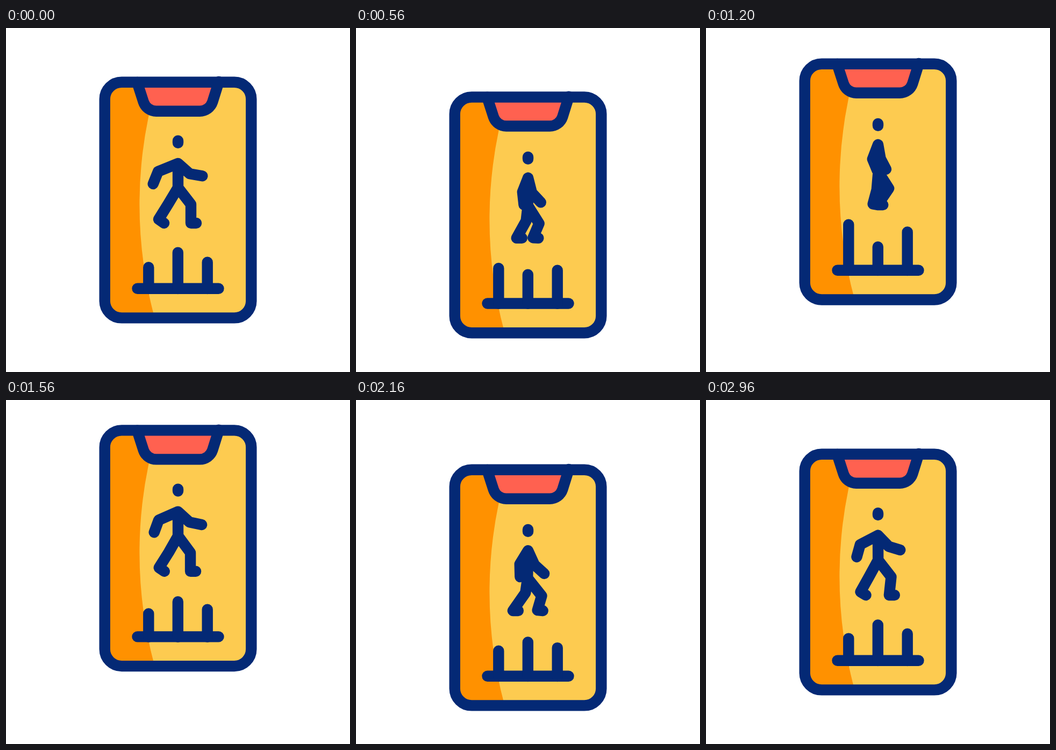
Recreate the animation shown at these times as an HTML page. Size 640 px wide and 640 px high, loop 3000 ms.

```html
<!DOCTYPE html>
<html lang="en">
<head>
<meta charset="utf-8">
<title>Step counter</title>
<style>
  html, body { margin: 0; width: 100%; height: 100%; overflow: hidden; background: #fff; }
  svg { display: block; width: 100%; height: 100%; }
  .line { fill: none; stroke: #042975; stroke-width: 20.4; stroke-linecap: round; stroke-linejoin: round; }
</style>
</head>
<body>
<svg viewBox="0 0 640 640">
  <defs>
    <clipPath id="screen"><rect x="183.7" y="100.7" width="272.6" height="438.7" rx="31.5"/></clipPath>
  </defs>
  <g id="phone">
    <g clip-path="url(#screen)">
      <rect x="183" y="100" width="274" height="440" fill="#fdcb50"/>
      <path d="M183 100H281.5A805 805 0 0 0 276.7 540H183Z" fill="#ff9100"/>
      <path d="M244 101L255.8 137.6A25 25 0 0 0 279.5 154.7H360.5A25 25 0 0 0 384.2 137.6L396 100Z" fill="#ff6150"/>
    </g>
    <path class="line" d="M244 101L255.8 137.6A25 25 0 0 0 279.5 154.7H360.5A25 25 0 0 0 384.2 137.6L396 100"/>
    <rect class="line" x="183.7" y="100.7" width="272.6" height="438.7" rx="31.5"/>
    <path class="line" d="M244.5 484.7H395.5"/>
    <path class="line" id="bars"/>
    <path class="line" id="walker"/>
  </g>
</svg>
<script>
const LOOP = 3000, STEP = 40, STRIDE = LOOP / 2, BEAT = LOOP / 4;
const LOW = 31.3, HIGH = -44.3;
const [phone, bars, walker] = ['phone', 'bars', 'walker'].map(id => document.getElementById(id));

const clamp = u => Math.min(1, Math.max(0, u));
const smooth = u => u * u * (3 - 2 * u);
const mix = (a, b, u) => a + (b - a) * u;

// cubic-bezier(.25, .1, .25, 1)
function ease(x) {
  const curve = (p, q, u) => 3 * p * u * (1 - u) ** 2 + 3 * q * u * u * (1 - u) + u ** 3;
  let lo = 0, hi = 1;
  for (let i = 0; i < 24; i++) {
    const u = (lo + hi) / 2;
    if (curve(0.25, 0.25, u) < x) lo = u; else hi = u;
  }
  return curve(0.1, 1, lo);
}

// The phone sinks, jumps, sinks again and returns
function lift(t) {
  const go = (y, to, start, length) => mix(y, to, ease(clamp((t - start) / length)));
  let y = go(0, LOW, 330, 380);
  y = go(y, HIGH, 768, 760);
  y = go(y, LOW, 1568, 760);
  return go(y, 0, 2368, 380);
}

function drawBars(t) {
  const s = smooth(1 - Math.abs(1 - 2 * (t % BEAT) / BEAT));
  const bar = (x, from, to) => `M${x} ${mix(from, to, s).toFixed(2)}V485`;
  return bar(265.3, 445.2, 394.2) + bar(319.8, 417.7, 443.7) + bar(374.7, 435.7, 410.7);
}

// Each joint swings along an arc and back; the swinging knee leads
function drawWalker(time) {
  const t = time % STRIDE;
  const back = t > BEAT;
  const s = back ? 1 - smooth(clamp((t - 790) / 790)) : smooth(t / BEAT);
  const arc = 4 * s * (1 - s);
  const sink = 3.5 * smooth(clamp(1 - Math.abs(t - 840) / 180));

  const joint = (from, to, sag, lead = 0) => [
    mix(from[0], to[0], s) + arc * (sag[0] + (back ? -lead : lead)),
    mix(from[1], to[1], s) + arc * sag[1]
  ];
  const upper = (...path) => {
    const [x, y] = joint(...path);
    return [x, y + sink];
  };
  const toe = foot => [foot[0] + 10, 363];
  const limb = (...points) => 'M' + points.map(p => p.map(n => n.toFixed(2)).join(' ')).join('L');

  const head = upper([320, 209.8], [320, 211.8], [0, 1]);
  const neck = upper([320, 252], [320, 251.3], [0, -0.7]);
  const hip = upper([320, 297], [319, 302.3], [1, 2]);
  const footA = joint([284, 356], [340.5, 362], [-2, 2.5], -2);
  const footB = joint([344, 363], [289.5, 363], [1, 0]);

  return limb(head, [head[0], head[1] + 4]) +
    limb(neck, hip) +
    limb(neck, upper([283, 267], [333.5, 277], [3, 6]), upper([273.7, 290], [352, 293], [8, 7.5])) +
    limb(neck, upper([342, 271.3], [303, 276], [1, 3.5]), upper([365.3, 275.2], [303, 299.5], [-1, 10])) +
    limb(hip, joint([302, 327], [347, 335], [-2, 4], 3.5), footA, toe(footA)) +
    limb(hip, joint([344, 328], [315, 329], [2, 4], -7.8), footB, toe(footB));
}

const began = performance.now();

function draw() {
  const now = Math.max(0, performance.now() - began);
  const t = Math.floor((now + 4) / STEP) * STEP % LOOP;
  phone.setAttribute('transform', `translate(0 ${lift(t).toFixed(2)})`);
  bars.setAttribute('d', drawBars(t));
  walker.setAttribute('d', drawWalker(t));
  requestAnimationFrame(draw);
}
draw();
</script>
</body>
</html>
```
